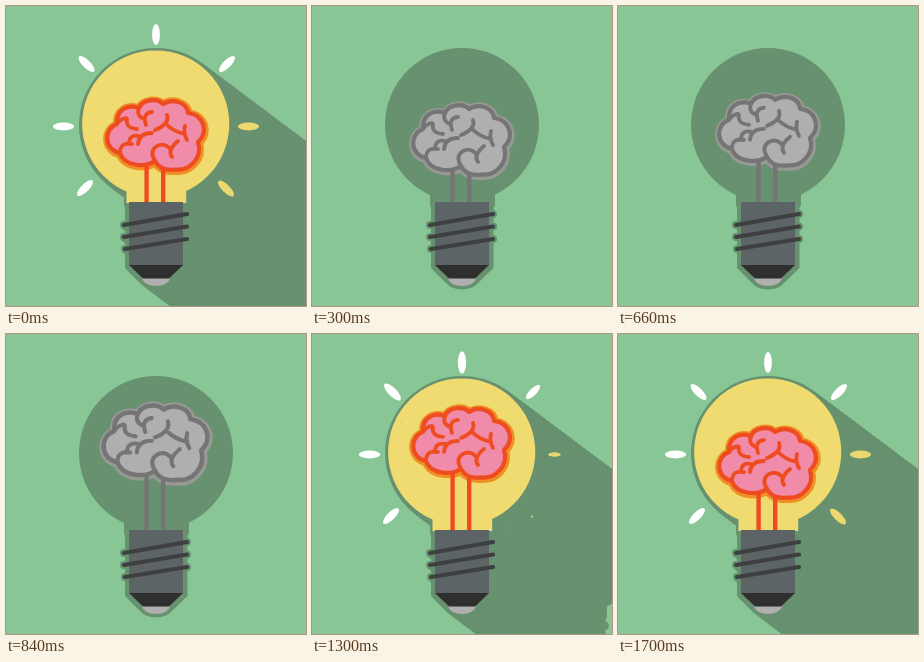
Animation of 300x300 px, one loop 2.32 s. Source, as an HTML page with a canvas:

```html
<!DOCTYPE html>
<html lang="en">
<head>
<meta charset="utf-8">
<title>Bright idea</title>
<style>
  html, body { margin: 0; width: 100%; height: 100%; overflow: hidden; background: #88c795; }
  canvas { display: block; width: 300px; height: 300px; }
</style>
</head>
<body>
<canvas id="stage"></canvas>
<script>
const LOOP = 2320;
const canvas = document.getElementById('stage');
const ctx = canvas.getContext('2d');
const ratio = window.devicePixelRatio || 1;
canvas.width = canvas.height = 300 * ratio;

const GREEN = '#88c795', SHADE = '#67916f';
const REACH = 126;            // final horizontal length of the cast shadow
const SLOPE = 0.75;

const clamp = v => Math.min(1, Math.max(0, v));
const span = (t, from, to) => clamp((t - from) / (to - from));
const mix = (a, b, p) => a + (b - a) * p;
const easeOut = (p, n) => 1 - (1 - p) ** n;
const easeInOut = p => p < 0.5 ? 4 * p ** 3 : 1 - 4 * (1 - p) ** 3;
const smooth = p => p * p * (3 - 2 * p);
const blend = (off, on, p) => `rgb(${off.map((v, i) => Math.round(mix(v, on[i], p)))})`;

// Bulb shapes
const threads = [[118, 219, 181, 208], [118, 231, 181, 220.5], [119, 243, 181, 233]];

const glass = new Path2D();
glass.arc(149.7, 118, 73.6, 0, 7);
glass.rect(120.5, 170, 59.7, 27);

const outline = new Path2D('M118 180H183V199L181.5 202V262L166 277Q161 283 150 283.5Q139 283 134 277L119 262V202L118 199Z');
outline.moveTo(227, 119);
outline.arc(150, 119, 77, 0, 7);
for (const [x1, y1, x2, y2] of threads) {
  for (const [x, y] of [[x1, y1], [x2, y2]]) {
    outline.moveTo(x + 4, y);
    outline.arc(x, y, 4, 0, 7);
  }
}

// Brain, drawn around its resting place
const BRAIN = { x: 149.3, y: 129.5 };
const lobes = new Path2D(`M114 147C98 144 97 123 111 118C110 104 121 98 133 102
  C137 93 151 92 157 98C166 92 181 96 182 107C198 109 203 126 192 136
  C197 152 183 165 170 163.5C159 165 152 161 149 155C139 162 118 160 114 147Z`);
const folds = new Path2D(`M111 118Q114 113 120 112M121 113Q119 122 131 123
  M133 102Q130 110 138 113M146 106Q136 107 140 119M161 109Q164 118 149 124
  M160 118Q168 126 179 128M179 120Q177 127 181 134M114 147Q114 136 126 138
  M123 138Q123 128 133 130M132 138Q133 127 146 127
  M149 155Q143 145 151 140Q159 136 165 144M172 135Q161 144 166 151`);

// Rays in order of appearance: x, y, turn in degrees, colour
const rays = [
  [79, 182, 45, '#fff'], [57.5, 120.5, 90, '#fff'], [80.5, 58, 135, '#fff'],
  [150, 28.5, 0, '#fff'], [221, 58, 45, '#fff'],
  [242.5, 120.5, 90, '#ecd870'], [220, 182.5, 135, '#ecd870']
];

function rayScale(t, i) {
  if (t < 900) return 1 - span(t, 40, 300) ** 2.6;
  const age = t - 985 - 50 * i;
  if (age <= 0) return 0;
  if (age < 180) return 1.07 * easeOut(age / 180, 1.75);
  return mix(1.07, 1, smooth(span(age, 180, 300)));
}

function shadowLength(t) {
  return t < 900
    ? REACH * (1 - span(t, 40, 300)) ** 2.7
    : REACH * easeOut(span(t, 980, 1600), 3);
}

function litLevel(t) {
  return t < 900 ? 1 - span(t, 40, 300) ** 2.6 : span(t, 960, 1010);
}

function brainShift(t) {
  if (t < 540) return 5 * easeInOut(span(t, 40, 300));
  if (t < 1300) return mix(5, -20.2, smooth(span(t, 530, 850)));
  if (t < 1590) return mix(-20.2, 3.2, smooth(span(t, 1290, 1590)));
  return 3.2 * (1 - smooth(span(t, 1590, 1705)));
}

function brainScale(t) {
  return 1 + 0.13 * smooth(span(t, 640, 1010)) * (1 - smooth(span(t, 1040, 1280)));
}

function stroke(path, color, width) {
  ctx.strokeStyle = color;
  ctx.lineWidth = width;
  ctx.stroke(path);
}

function fill(path, color) {
  ctx.fillStyle = color;
  ctx.fill(path);
}

function line(x1, y1, x2, y2, color, width) {
  const path = new Path2D();
  path.moveTo(x1, y1);
  path.lineTo(x2, y2);
  stroke(path, color, width);
}

function drawShadow(length) {
  const steps = Math.ceil(length);
  for (let i = 0; i <= steps; i++) {
    const d = Math.min(i, length);
    ctx.save();
    ctx.translate(d, d * SLOPE);
    fill(outline, SHADE);
    ctx.restore();
  }
}

function drawRays(t) {
  rays.forEach(([x, y, turn, color], i) => {
    const s = rayScale(t, i);
    if (s <= 0) return;
    const ray = new Path2D();
    ray.ellipse(x, y, 3.9 * s, 10.6 * s, turn * Math.PI / 180, 0, 7);
    fill(ray, color);
  });
}

function drawBrain(t, lit) {
  const dy = brainShift(t), s = brainScale(t);
  const red = blend([117, 117, 117], [238, 75, 32], lit);
  const place = (x, y, draw) => {
    ctx.save();
    ctx.translate(BRAIN.x + x, BRAIN.y + dy + y);
    ctx.scale(s, s);
    ctx.translate(-BRAIN.x, -BRAIN.y);
    draw();
    ctx.restore();
  };
  place(0.4, 0.8, () => stroke(lobes, blend([151, 153, 148], [239, 144, 36], lit), 9));
  ctx.lineCap = 'butt';
  for (const x of [140.6, 157.2]) line(x, BRAIN.y + dy + 20 * s, x, 196.5, red, 4.4);
  ctx.lineCap = 'round';
  place(0, 0, () => {
    fill(lobes, blend([175, 175, 175], [240, 140, 170], lit));
    stroke(lobes, red, 4.2);
    stroke(folds, red, 3.8);
  });
}

function drawBase() {
  fill(new Path2D('M123 196H177V260H123Z'), '#5c6466');
  fill(new Path2D('M136 272H164C162 282.5 138 282.5 136 272Z'), '#b0b0b0');
  fill(new Path2D('M123 259H177L163 272.5H137Z'), '#302f30');
  for (const ends of threads) line(...ends, '#3e3f41', 4.2);
}

function glow(x, y, r, rgb, alpha) {
  const g = ctx.createRadialGradient(x, y, 0, x, y, r);
  g.addColorStop(0, `rgba(${rgb},${alpha})`);
  g.addColorStop(0.35, `rgba(${rgb},${alpha * 0.4})`);
  g.addColorStop(1, `rgba(${rgb},0)`);
  ctx.fillStyle = g;
  ctx.fillRect(x - r, y - r, 2 * r, 2 * r);
}

function drawShine(t) {
  const power = span(t, 960, 1015) * (1 - span(t, 1025, 1340)) ** 1.6;
  if (power <= 0) return;
  const x = 95.5, y = 88;
  glow(x, y, 210, '255,255,255', 0.16 * power);
  glow(x, y, 8 + 34 * power, '255,255,235', 0.8 * power);
  glow(195, 195, 26, '150,215,180', 0.25 * power);
  ctx.save();
  ctx.translate(x, y);
  for (const [turn, reach] of [[45, 92], [-45, 88], [20, 32], [-70, 32]]) {
    ctx.save();
    ctx.rotate(turn * Math.PI / 180);
    ctx.scale(reach * power, 1.3);
    glow(0, 0, 1, '255,255,255', 0.75 * power);
    ctx.restore();
  }
  ctx.restore();
  glow(x, y, 3 + 11 * power, '255,255,255', Math.min(1, 0.2 + power));
  const core = new Path2D();
  core.arc(x, y, 6.5 * power, 0, 7);
  fill(core, `rgba(255,255,255,${power})`);
}

function draw(now) {
  const t = now % LOOP;
  const lit = litLevel(t);
  ctx.setTransform(ratio, 0, 0, ratio, 0, 0);
  ctx.lineCap = ctx.lineJoin = 'round';
  ctx.fillStyle = GREEN;
  ctx.fillRect(0, 0, 300, 300);
  drawShadow(shadowLength(t));
  drawRays(t);
  ctx.globalAlpha = lit;
  fill(glass, '#efdb70');
  ctx.globalAlpha = 1;
  drawBrain(t, lit);
  drawBase();
  drawShine(t);
  requestAnimationFrame(draw);
}

draw(performance.now());
</script>
</body>
</html>
```
